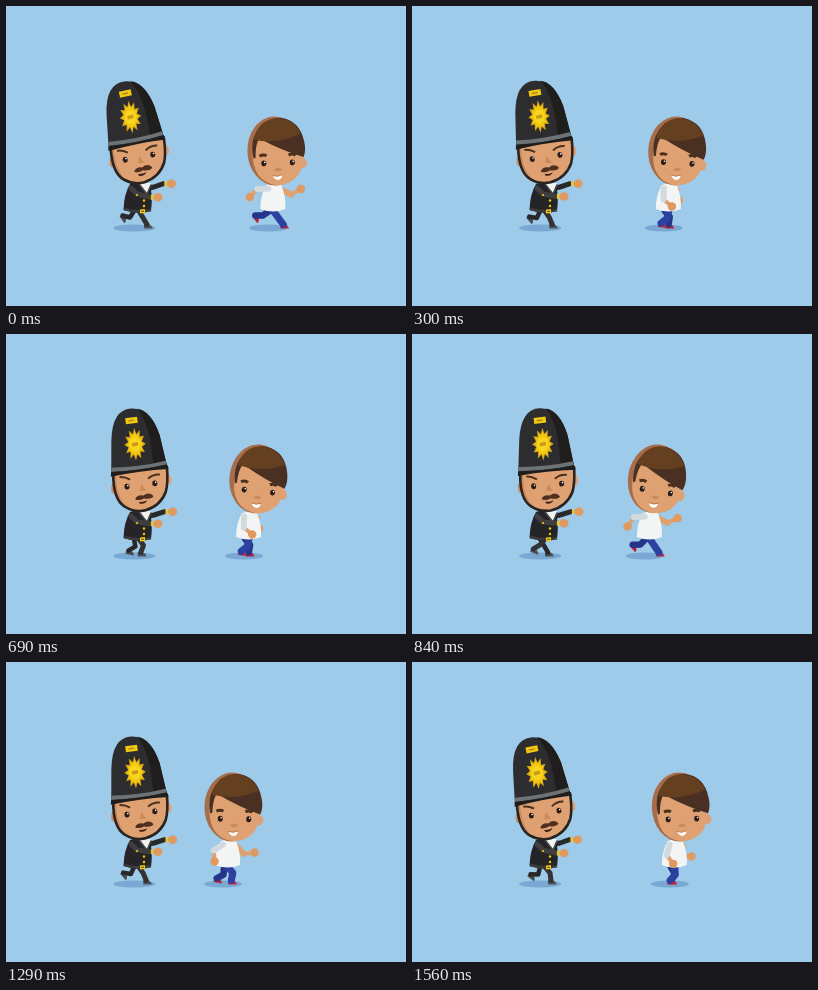
Animation, 400 px wide and 300 px high, one loop 1.59 s. Source, as an HTML page with a canvas:

```html
<!DOCTYPE html>
<html lang="en">
<head>
<meta charset="utf-8">
<title>Chase</title>
<style>
html, body { margin: 0; width: 100%; height: 100%; overflow: hidden; background: #9dcbe9; }
canvas { display: block; width: 400px; height: 300px; }
</style>
</head>
<body>
<canvas id="stage"></canvas>
<script>
const LOOP = 1590, STEP = 30;
const canvas = document.getElementById('stage');
const ctx = canvas.getContext('2d');
const scale = Math.max(1, window.devicePixelRatio || 1);
canvas.width = 400 * scale;
canvas.height = 300 * scale;

const SKIN = '#dfa172', SHADE = '#c98a5c', HAND = '#e0995f';
const BLACK = '#2d2c2e', DARK = '#201e1d', GOLD = '#f2c811';

// Key points [time, value]: the boy's tilt and strides run, the officer's tilt
const BOY_TILT = [[0, -2], [540, 8], [690, 6], [1020, 13], [1290, 1], [LOOP, -2]];
const BOY_RUN = [[0, 0], [300, 1.31], [540, 2.25], [690, 2.69], [1020, 3.5], [1290, 4.83], [1560, 5.73], [LOOP, 6]];
const COP_TILT = [[0, -7], [300, -4.8], [540, 0], [690, -3.2], [1020, 0], [1290, -3.2], [LOOP, -7]];

function at(keys, t) {
  const i = keys.findIndex(k => k[0] > t);
  const [t0, a] = keys[i - 1], [t1, b] = keys[i];
  return a + (b - a) * (t - t0) / (t1 - t0);
}

const wave = turns => Math.cos(turns * 2 * Math.PI);

function fill(d, color) {
  ctx.fillStyle = color;
  ctx.fill(new Path2D(d));
}

function line(d, color, width, cap = 'round') {
  ctx.strokeStyle = color;
  ctx.lineWidth = width;
  ctx.lineCap = cap;
  ctx.lineJoin = 'round';
  ctx.stroke(new Path2D(d));
}

function oval(x, y, rx, ry, color) {
  ctx.fillStyle = color;
  ctx.beginPath();
  ctx.ellipse(x, y, rx, ry, 0, 0, 7);
  ctx.fill();
}

function placed(x, y, deg, draw) {
  ctx.save();
  ctx.translate(x, y);
  ctx.rotate(deg * Math.PI / 180);
  draw();
  ctx.restore();
}

// Middle joint of a two-bone limb
function joint(x, y, hx, hy, len, side) {
  const dx = hx - x, dy = hy - y, dist = Math.hypot(dx, dy) || 1;
  const bend = Math.sqrt(Math.max(0, len * len - dist * dist / 4)) * side / dist;
  return [x + dx / 2 - dy * bend, y + dy / 2 + dx * bend];
}

// A foot reaches forward at whole strides and lifts behind the body
function leg(hipX, midX, reach, strides, color, shoe, width) {
  const swing = wave(strides), lift = Math.max(0, -swing) ** 2;
  const fx = midX + reach * swing, fy = 221 - 9 * lift, ay = fy - 2.5;
  const [kx, ky] = joint(hipX, 205, fx, ay, 7.7, -1);
  placed(fx, fy, lift * 55, () => fill('M-3 -3 L1 -3 Q5.5 -1.5 5.5 1.5 L-3 1.5 Z', shoe));
  line(`M${hipX} 205 L${kx} ${ky} L${fx} ${ay}`, color, width);
}

function boyArm(x, y, hx, hy, sleeve) {
  const [ex, ey] = joint(x, y, hx, hy, 11, 1);
  line(`M${ex} ${ey} L${hx} ${hy}`, SKIN, 4);
  line(`M${x} ${y} L${ex} ${ey}`, sleeve, 6);
  oval(hx, hy, 4.2, 4.2, HAND);
}

function eye(x, y) {
  oval(x, y, 2.5, 2.9, '#2a1c17');
  oval(x + .9, y - 1, .8, .8, '#fff');
}

function boyFace() {
  oval(-1.5, 0, 27.5, 34.5, '#a76c49');
  oval(26, 13, 4, 5, SKIN);
  fill('M-24 0 Q-24 -25 2 -28 Q27 -22 27 4 Q26 33 0 34.5 Q-25 31 -24 0 Z', SKIN);
  fill('M-23 7 Q-27 -12 -16 -24 Q-7 -33 5 -33 Q24 -30 28 -9 Q30 0 27 7 Q8 1 -17 -13 Q-21 -6 -21 6 Z', '#4a3022');
  fill('M-22 -12 Q-17 -33 3 -33 Q18 -31 25 -17 Q2 -6 -22 -12 Z', '#643f20');
  line('M-17 4.5 Q-13 2.5 -10 4.5 M12 4.5 Q16 2.5 19 5', '#49301f', 3, 'butt');
  eye(-13, 12);
  eye(15.5, 12);
  oval(1, 18.5, 3.5, 1.7, SHADE);
  fill('M-4.5 24.5 Q0 26.5 5 24 Q4.5 28.5 1 29 Q-2.5 29 -4.5 24.5 Z', '#fff');
  line('M-4.5 24.5 Q0 26.5 5 24', '#b56f48', .8);
}

function boy(t) {
  const x = 262.3 - 45.3 * Math.min(t / 1290, (LOOP - t) / 300);
  const tilt = at(BOY_TILT, t), run = at(BOY_RUN, t), swing = wave(run);
  placed(x, 0, 0, () => {
    oval(0, 222, 19, 3.4, '#78a8d3');
    boyArm(13, 184, 24.5 + 21 * swing - 13 * swing ** 2, 194 - 4 * swing - 7 * swing ** 2, SKIN);
    leg(1, 0, 13, run + .5, '#253589', '#bf2033', 6.5);
    leg(5, 2, 13, run, '#2c409f', '#c9233a', 7);
    fill('M-2 179 Q6 176 13 179 Q18 191 17 203 Q5 208 -8 203 Q-8 189 -2 179 Z', '#f3f5f5');
  });
  // The head counters the arms
  placed(x + 11.3 + .35 * tilt - 2.5 * swing, 145, tilt, boyFace);
  placed(x, 0, 0, () => boyArm(0, 182.5, 1 - 19.5 * swing, 202 - 11 * swing ** 2, '#d3dadd'));
}

function star(rx, ry, points, inner) {
  let d = '';
  for (let i = 0; i < points * 2; i++) {
    const a = i * Math.PI / points - Math.PI / 2, k = i % 2 ? inner : 1;
    d += `${i ? 'L' : 'M'}${133 + Math.cos(a) * rx * k} ${110 + Math.sin(a) * ry * k}`;
  }
  return d + 'Z';
}

function helmet() {
  fill('M107.5 139 L109.5 105 Q112 74 131 74 Q150 74 158 102 L164 135 Q137 137 107.5 139 Z', BLACK);
  fill('M137 74.5 Q151 77 158 102 L163.5 133 L150 133 Q150 91 137 74.5 Z', DARK);
  line('M108 134 Q136 135 163 130', '#6d7277', 4, 'butt');
  fill('M107.5 136.5 Q137 136.5 163.5 132 L165 136.5 Q137 136.5 107 141 Z', DARK);
  fill('M124.5 83.5 L136.5 82.5 L137 88.5 L125 89.5 Z', GOLD);
  line('M128 86.3 L133 85.9', '#a5801b', 1.2);
  fill(star(10.8, 16.3, 12, .65), '#d8a916');
  fill(star(8.2, 12.5, 12, .75), GOLD);
  oval(133, 110, 5.5, 7, '#f8d51f');
  line('M130 110.5 L136 109.5', '#c99a18', 3.5, 'butt');
}

// Drawn upright in stage coordinates
function copHead() {
  oval(109.5, 153, 2.8, 5, SHADE);
  oval(164.5, 147, 2.6, 5, SKIN);
  fill('M109.5 137 Q107 164 119 172 Q128 178 139 177 Q155 174 161 160 Q165 150 164 132 Z', SKIN);
  fill('M110 139 Q108 164 121 172 Q111 160 112.5 138 Z', SHADE);
  line('M109.5 138 Q108 164 119 171.5 Q128 178 139 176.5 Q155 173 161 159 Q164 150 163.5 134', '#292321', 2.6);
  line('M115.5 142 Q120 141.5 126 145 M144 145 Q149 140.5 156 141.5', '#49301f', 2, 'butt');
  eye(122.5, 151.8);
  eye(150.5, 150);
  fill('M137 150 L141.5 157 L135 157 Z', SHADE);
  fill('M130 165 Q132 160 138.5 161.5 Q144 157.5 148.5 162.5 Q147 166 139 164.5 Q134 167 130 165 Z', '#4f3020');
  fill('M133.5 167.5 Q138 168.5 142 166.5 Q140 170.5 134.5 169.5 Z', '#3a2019');
  helmet();
}

function copArm(x, y, ex, ey, hx, hy, color) {
  line(`M${x} ${y} L${ex} ${ey} L${hx - 8} ${hy}`, color, 5);
  line(`M${hx - 6} ${hy - 2.5} L${hx - 6} ${hy + 2.5}`, GOLD, 2.2, 'butt');
  oval(hx, hy, 4.5, 4.2, HAND);
}

function cop(t) {
  const tilt = at(COP_TILT, t), run = 5 * t / LOOP;
  oval(128.2, 222, 21, 3.4, '#78a8d3');
  copArm(143, 182, 148, 181, 167.5 + .3 * tilt, 177.7, '#2a292a');
  leg(128, 128.5, 12, run + .5, '#29282a', '#4a4b4e', 4.5);
  leg(133, 129, 12, run, '#333234', '#505155', 5);
  fill('M124 178 Q134 174 144 178 Q147 192 145 205 Q132 209 117.5 204 Q118 188 124 178 Z', '#252426');
  fill('M133 177 L145 177 L141 188 Z', '#f2f3f3');
  line('M133 178 L141 188 L145 179', '#4a4a4c', 1.5);
  line('M118.5 203 Q132 207 145 204', '#3c3b3d', 2.5, 'butt');
  fill('M134 203.5 L139 203 L139 207 L134 207.5 Z', GOLD);
  line('M135.7 205.3 L137.5 205.2', '#45391b', 1);
  for (let y = 189; y < 202; y += 5.5) oval(138, y, 1.2, 1.2, GOLD);
  placed(137, 180, tilt, () => {
    ctx.translate(-137, -180);
    copHead();
  });
  copArm(125, 182, 131, 188, 152, 188.5 - .4 * tilt, '#403f40');
  oval(131, 189, 1.1, 1.1, GOLD);
}

function draw(t) {
  ctx.setTransform(scale, 0, 0, scale, 0, 0);
  ctx.fillStyle = '#9dcbe9';
  ctx.fillRect(0, 0, 400, 300);
  cop(t);
  boy(t);
}

const start = performance.now();
function tick() {
  const t = (performance.now() - start) % LOOP;
  draw(Math.floor(t / STEP) * STEP);
  requestAnimationFrame(tick);
}
tick();
</script>
</body>
</html>
```
